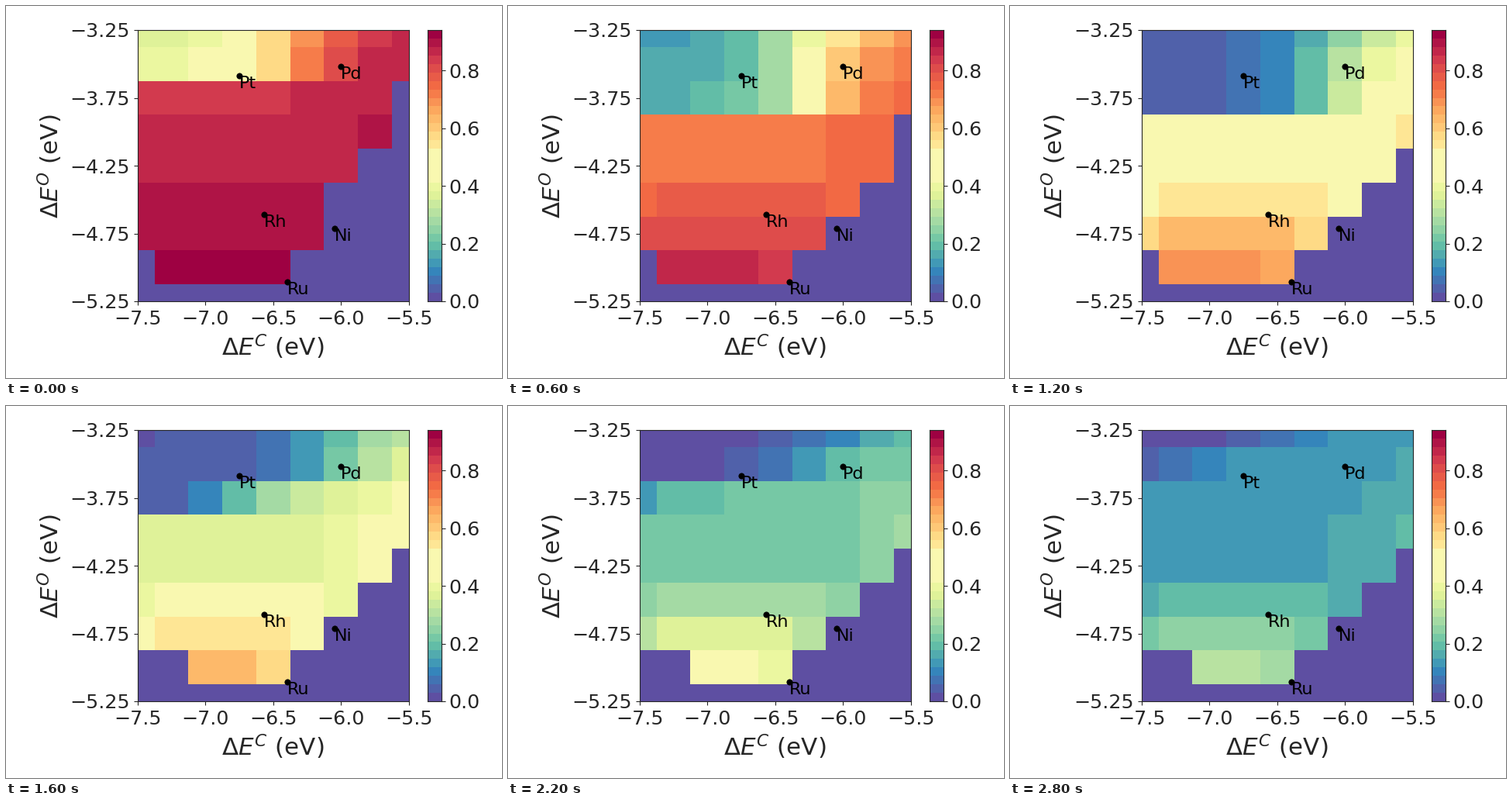
Animation, 640 px wide and 480 px high, one loop 3 s. Source, as a matplotlib script:

```python
import numpy as np
import matplotlib.pyplot as plt
from matplotlib.animation import FuncAnimation
from matplotlib.colors import ListedColormap

W, H, DPI = 640, 480, 100
N_FRAMES, STEP_MS = 15, 200
V_MAX, N_BANDS = 0.94, 32
INK = "#262626"

plt.rcParams.update({
    "font.family": "DejaVu Sans",
    "font.size": 18,
    "mathtext.fontset": "dejavusans",
    "text.color": INK,
    "axes.edgecolor": INK,
    "xtick.color": INK,
    "ytick.color": INK,
})

row, col = np.mgrid[:9, :9]


def sigmoid(x):
    return 1 / (1 + np.exp(-x))


def basin(i):
    """Low-coverage zone in the top three rows; its front retreats leftwards."""
    r = np.minimum(row, 2)
    front = 4.9 - 1.2 * np.maximum(0, i - (12 - r * (r + 1)))
    grow = np.where(row == 2, min(1, 0.15 + i), 1)
    depth = (3.1 - 0.2 * r) * grow * (row < 3)
    return depth * sigmoid((front - col) / (1.2 - 0.2 * r))


def active(i):
    """Cells right of a diagonal are empty; those along it fill up in turn."""
    gap = 11 - row - col
    on = (gap >= 0) & (row < 8) & (i >= 2 * col - 11 - 4 * gap)
    return on & ((row < 7) | (col > (i >= 8)))


def field(i):
    level = np.interp(i, [0, 2, 4, 6, 9, 11, 14],
                      [2.55, 1.65, 0.75, -0.08, -0.62, -1.22, -1.77])
    lower = 0.37 * np.maximum(0, row - 4)
    tilt = 0.04 * np.minimum(row, 3) * np.maximum(0, col - 5) * (row < 5)
    ends = 0.2 * (row > 4) * ((col == 0) | (row + col == 11))
    return active(i) * sigmoid(level + lower + tilt - ends - basin(i))


def edges(lo, hi):
    """Nearest-neighbour cell borders: half cells at both ends."""
    mid = lo + (np.arange(8) + 0.5) * (hi - lo) / 8
    return np.concatenate([[lo], mid, [hi]])


def box(fig, x, y, w, h):
    return fig.add_axes([x / W, 1 - (y + h) / H, w / W, h / H])


fig = plt.figure(figsize=(W / DPI, H / DPI), dpi=DPI, facecolor="white")
ax = box(fig, 169.8, 31, 350, 350)
cax = box(fig, 544, 31, 17.5, 350)

# stepped colours with one wide pale band in the middle
bands = plt.get_cmap("Spectral_r")(np.linspace(0, 1, N_BANDS))
bands[14:18] = (0.976, 0.973, 0.69, 1)
cmap = ListedColormap(bands)

mesh = ax.pcolormesh(edges(-7.5, -5.5), edges(-3.25, -5.25), field(0),
                     cmap=cmap, vmin=0, vmax=1, antialiased=False)
ax.set_xlim(-7.5, -5.5)
ax.set_ylim(-5.25, -3.25)
ax.set_xticks(np.arange(-7.5, -5.4, 0.5))
ax.set_yticks(np.arange(-5.25, -3.2, 0.5))
ax.xaxis.set_major_formatter("{x:.1f}")
ax.yaxis.set_major_formatter("{x:.2f}")
ax.tick_params(labelsize=18.2)
ax.tick_params(axis="x", pad=4.3)

cax.pcolormesh([0, 1], np.linspace(0, V_MAX, N_BANDS + 1),
               np.arange(N_BANDS)[:, None], cmap=cmap,
               vmin=-0.5, vmax=N_BANDS - 0.5, antialiased=False)
cax.set_xlim(0, 1)
cax.set_ylim(0, V_MAX)
cax.set_xticks([])
cax.set_yticks(np.arange(0, 0.9, 0.2))
cax.yaxis.tick_right()
cax.yaxis.set_major_formatter("{x:.1f}")
cax.tick_params(labelsize=18.2)

fig.text(344.5 / W, 1 - 451.5 / H, r"$\Delta E^C$ (eV)", size=22.3,
         ha="center", va="baseline")
fig.text(68.5 / W, 1 - 206.5 / H, r"$\Delta E^O$ (eV)", size=22.3, rotation=90,
         rotation_mode="anchor", ha="center", va="baseline")

metals = {
    "Pt": (-6.75, -3.587),
    "Pd": (-6.0, -3.517),
    "Rh": (-6.567, -4.61),
    "Ni": (-6.047, -4.715),
    "Ru": (-6.395, -5.105),
}
for name, (x, y) in metals.items():
    ax.plot(x, y, "o", color="black", ms=5.2, mew=0.6)
    ax.text(x, y, name, color="black", size=16, ha="left", va="top")


def draw(i):
    mesh.set_array(field(i))
    return [mesh]


anim = FuncAnimation(fig, draw, frames=N_FRAMES, interval=STEP_MS,
                     repeat=True, repeat_delay=0, blit=False)
plt.show()
```
